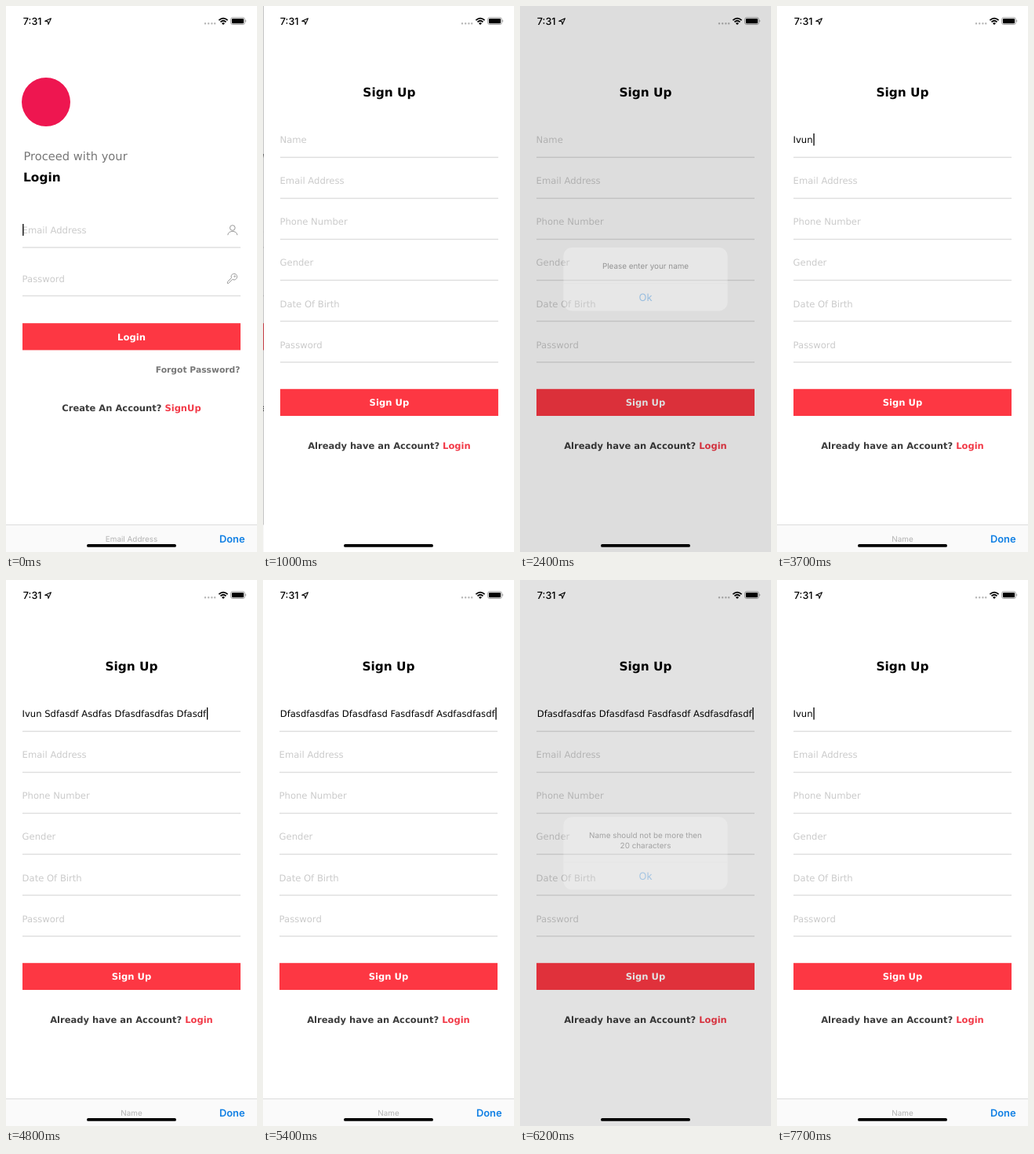
Animation, 320 px wide and 694 px high, one loop 8 s. Source, as an HTML page:

```html
<!DOCTYPE html>
<html lang="en">
<head>
<meta charset="utf-8">
<title>Sign up validation</title>
<style>
  html, body { margin: 0; width: 100%; height: 100%; overflow: hidden; background: #fff; }
  svg { display: block; width: 100vw; height: 100vh; }
  text { font: 11.6px "DejaVu Sans", sans-serif; text-rendering: geometricPrecision; white-space: pre; }
  .bold { font-weight: bold; }
  .title { font-size: 15.4px; font-weight: bold; }
  .mid { text-anchor: middle; }
  .end { text-anchor: end; }
  .hint { fill: #cbcbcb; }
  .note { font-size: 11.5px; font-weight: bold; fill: #3c3c3c; }
  .link { fill: #f23a48; }
  .rule { fill: #dedede; }
  .button { fill: #fd3743; }
  .icon { fill: none; stroke: #999; stroke-width: 1; }
  .ui { font-family: Inter, sans-serif; font-size: 9.9px; }
  .blue { fill: #0f7fe4; }
</style>
</head>
<body>
<svg viewBox="0 0 320 694" preserveAspectRatio="none">
  <defs>
    <clipPath id="fieldClip"><rect x="20" y="155" width="279" height="32"/></clipPath>
    <linearGradient id="edge"><stop offset="0" stop-opacity="0"/><stop offset="1" stop-opacity=".2"/></linearGradient>
  </defs>

  <g id="login">
    <rect width="320" height="694" fill="#fff"/>
    <circle cx="51" cy="122" r="31" fill="#ee1650"/>
    <text x="22.4" y="196.3" fill="#777" style="font-size:14.7px">Proceed with your</text>
    <text x="22" y="222.6" class="title">Login</text>
    <text x="20.6" y="289.2" class="hint">Email Address</text>
    <text x="20.6" y="350.8" class="hint">Password</text>
    <rect class="rule" x="21" y="306.2" width="278" height="1.4"/>
    <rect class="rule" x="21" y="367.7" width="278" height="1.4"/>
    <rect id="emailCaret" x="21.2" y="277" width="1.3" height="15"/>
    <g class="icon">
      <circle cx="288.8" cy="282" r="3.3"/>
      <path d="M282.8 291.2C283 284.8 294.6 284.8 294.8 291.2"/>
      <path d="M287.4 345.6C285.6 340.2 292.4 338.6 294.2 342.4C295.6 346.4 292 349.4 288.8 347.4L283.6 352.6H282.4V350.6Z"/>
      <circle cx="291.6" cy="343.6" r=".8"/>
    </g>
    <rect class="button" x="21" y="403.2" width="278" height="34.2"/>
    <text x="160" y="424.8" class="bold mid" fill="#fff">Login</text>
    <text x="298.5" y="466.2" class="bold end" fill="#777" style="font-size:10.75px">Forgot Password?</text>
    <text x="160" y="515.4" class="note mid">Create An Account? <tspan class="link">SignUp</tspan></text>
    <rect id="loginShade" width="320" height="694"/>
  </g>

  <g id="signup">
    <rect x="-5" width="5" height="694" fill="url(#edge)"/>
    <rect width="320" height="694" fill="#fff"/>
    <text x="160" y="114.7" class="title mid">Sign Up</text>
    <g id="rows"></g>
    <g clip-path="url(#fieldClip)">
      <text id="typed" y="174.3"></text>
      <rect id="nameCaret" y="162" width="1.3" height="15.5"/>
    </g>
    <rect class="button" x="21" y="486.8" width="278" height="34.2"/>
    <text x="160" y="508.3" class="bold mid" fill="#fff">Sign Up</text>
    <text x="160" y="562.6" class="note mid">Already have an Account? <tspan class="link">Login</tspan></text>
  </g>

  <g id="status">
    <text x="21.8" y="23.6" class="ui" style="font-size:12.6px;font-weight:500">7:31</text>
    <path d="M49.6 19.2L57.4 15.8L54 23.4L53.4 19.8Z" fill="none" stroke="#000" stroke-width="1.1" stroke-linejoin="round"/>
    <path d="M254 22.2h0M258.2 22.2h0M262.4 22.2h0M266.2 22.2h0" stroke="#000" stroke-opacity=".28" stroke-width="2.5" stroke-linecap="round"/>
    <path d="M271.4 18.1Q277 13.2 282.6 18.1M273.5 20.3Q277 17.2 280.5 20.3" fill="none" stroke="#000" stroke-width="1.8"/>
    <path d="M275 21.9Q277 20.2 279 21.9L277 24Z"/>
    <rect x="286.6" y="14.7" width="17.8" height="8.8" rx="2.4" fill="none" stroke="#000" stroke-opacity=".4" stroke-width=".9"/>
    <rect x="287.9" y="16" width="15.2" height="6.2" rx="1.3"/>
    <path d="M305.4 17.6Q307.4 19.1 305.4 20.6Z" fill-opacity=".45"/>
  </g>

  <g id="toolbar">
    <rect y="659.3" width="320" height="35" fill="#fafafa"/>
    <rect y="659" width="320" height="1" fill="#dcdcdc"/>
    <text id="toolbarLabel" x="160" y="680.6" class="ui mid" fill="#b3b3b3"></text>
    <text x="304.6" y="681.8" class="ui end blue" style="font-size:12.9px;font-weight:600">Done</text>
  </g>

  <rect id="dim" width="320" height="694"/>
  <g id="alerts"></g>
  <rect x="103" y="684" width="114" height="3.8" rx="1.9"/>
</svg>

<script>
const LOOP = 8000;
const PUSH = 670;          // sign-up page starts sliding in
const NAME_FOCUS = 2450;
const NAME_BLUR = 5510;
const NAME_REFOCUS = 6200;
const LONG_NAME = "Ivun Sdfasdf Asdfas Dfasdfasdfas Dfasdfasd Fasdfasdf Asdfasdfasdf Asdfas";
const FIELD_X = 20.6, FIELD_WIDTH = 275;

const $ = id => document.getElementById(id);
const set = (id, attrs) => {
  for (const key in attrs) $(id).setAttribute(key, attrs[key]);
};
const show = (id, visible) => set(id, { visibility: visible ? "visible" : "hidden" });
const progress = (t, start, end) => Math.min(1, Math.max(0, (t - start) / (end - start)));
const easeOut = p => 1 - (1 - p) ** 3;

$("rows").innerHTML = ["Name", "Email Address", "Phone Number", "Gender", "Date Of Birth", "Password"]
  .map((label, i) => `
    <text id="hint${i}" class="hint" x="${FIELD_X}" y="${174.3 + 52.06 * i}">${label}</text>
    <rect class="rule" x="21" y="${191.7 + 52.06 * i}" width="278" height="1.4"/>`)
  .join("");

const alerts = [
  { id: "emptyAlert", open: 1740, close: 2260, top: 307, height: 80.4,
    lines: [["Please enter your name", 334.2]] },
  { id: "longAlert", open: NAME_BLUR, close: 6050, top: 301.2, height: 92.4,
    lines: [["Name should not be more then", 328.2], ["20 characters", 340.6]] },
];
$("alerts").innerHTML = alerts.map(({ id, top, height, lines }) => {
  const bottom = top + height;
  return `<g id="${id}">
    <rect x="55.4" y="${top}" width="209.2" height="${height}" rx="11" fill="#fcfcfc"/>
    <rect x="55.4" y="${bottom - 35}" width="209.2" height=".8" fill="#ededed"/>
    ${lines.map(([line, y]) => `<text class="ui mid" x="160" y="${y}">${line}</text>`).join("")}
    <text class="ui mid blue" x="160" y="${bottom - 12.4}" style="font-size:13px">Ok</text>
  </g>`;
}).join("");

function nameAt(t) {
  if (t < 3300) return "";
  if (t < 3700) return LONG_NAME.slice(0, 1);
  if (t < 7200) {
    const keyTime = Math.min(5400, Math.max(4000, Math.floor(t / 100) * 100));
    return LONG_NAME.slice(0, 4 + Math.round((keyTime - 4000) / 800 * 35));
  }
  return LONG_NAME.slice(0, t < 7600 ? 3 : 4);
}

function drawPush(t) {
  const s = Math.max(0, t - PUSH) * 0.0243;
  const left = t < 1100 ? (1 + s) * Math.exp(-s) : 0;
  set("login", { transform: `translate(${-96 * (1 - left)} 0)` });
  set("loginShade", { opacity: 0.1 * (1 - left) });
  set("signup", { transform: `translate(${320 * left} 0)` });
  show("signup", left < 1);
  show("emailCaret", t < 450);
  return left;
}

function drawToolbar(t, left) {
  let x = 0, down = 0;
  if (t < 1100) x = -320 * (1 - left);
  else if (t < NAME_BLUR) down = 1 - easeOut(progress(t, NAME_FOCUS, 2690));
  else if (t < NAME_REFOCUS) down = progress(t, NAME_BLUR, 5590);
  else down = 1 - easeOut(progress(t, NAME_REFOCUS, 6400));
  set("toolbar", { transform: `translate(${x} ${36 * down})` });
  $("toolbarLabel").textContent = t < 1100 ? "Email Address" : "Name";
}

function drawName(t) {
  const focused = t >= NAME_FOCUS && t < NAME_BLUR || t >= NAME_REFOCUS;
  const name = nameAt(t);
  const typed = $("typed");
  typed.textContent = focused || !name ? name : LONG_NAME.slice(0, 44) + "…";
  const width = name ? typed.getComputedTextLength() : 0;
  const scroll = focused ? Math.max(0, width - FIELD_WIDTH) : 0;
  set("typed", { x: FIELD_X - scroll });
  set("nameCaret", { x: FIELD_X + 0.8 + width - scroll });
  $("hint0").style.display = name ? "none" : "";
  $("nameCaret").style.display = focused ? "" : "none";
}

function drawAlerts(t) {
  let dim = 0;
  for (const { id, open, close } of alerts) {
    const shown = t < open ? 0 : 1 - Math.exp(-(t - open) * 0.0295);
    const alpha = shown * (1 - progress(t, close, close + 210));
    const scale = 1 + 0.2 * (1 - shown);
    set(id, {
      opacity: alpha,
      transform: `translate(160 347.3) scale(${scale}) translate(-160 -347.3)`,
    });
    dim = Math.max(dim, 0.4 * alpha);
  }
  set("dim", { opacity: dim });
}

function frame() {
  const t = performance.now() % LOOP;
  drawToolbar(t, drawPush(t));
  drawName(t);
  drawAlerts(t);
  requestAnimationFrame(frame);
}
frame();
</script>
</body>
</html>
```
